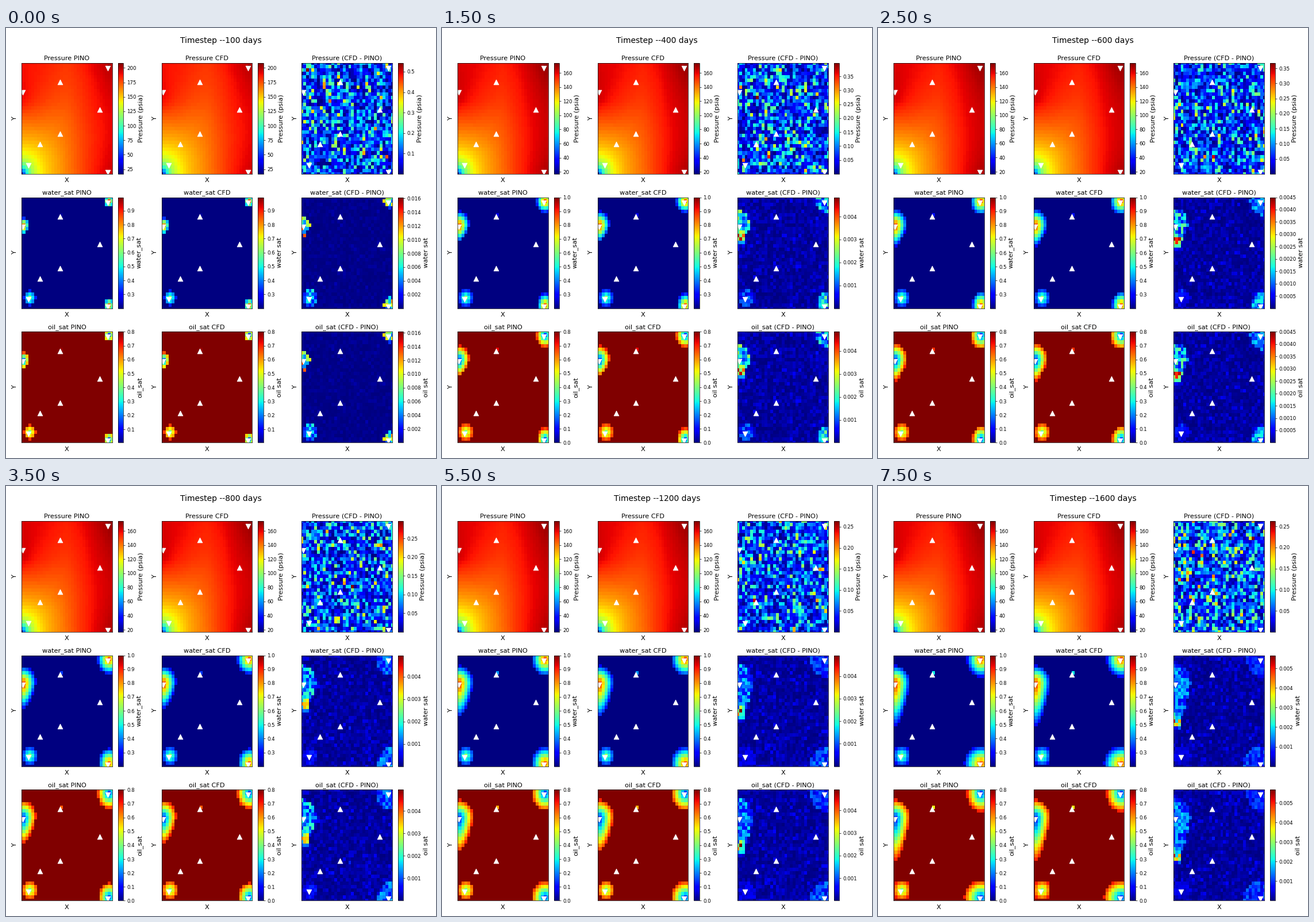
A matplotlib script that plays this animation: 748x748 px, repeating every 8000 ms.

```python
import numpy as np
import matplotlib.pyplot as plt
from matplotlib.animation import FuncAnimation

SIZE, FRAMES, STEP_MS, N = 748, 16, 500, 33
DPI = SIZE / 12
plt.rcParams["font.family"] = "DejaVu Sans"

INJECTORS = [(1, 24), (3, 3), (31, 1), (31, 31)]
PRODUCERS = [(14, 27), (28, 19), (14, 12), (7, 9)]
X, Y = np.meshgrid(np.arange(N), np.arange(N))

# Coarse relative pressure, top row first
PRESSURE = np.array([
    [.920, .910, .895, .875, .905, .950, .985],
    [.930, .905, .880, .865, .890, .930, .965],
    [.935, .885, .860, .850, .880, .920, .945],
    [.830, .830, .820, .825, .870, .910, .935],
    [.760, .765, .780, .810, .860, .905, .935],
    [.690, .700, .745, .800, .860, .910, .945],
    [.680, .680, .740, .795, .860, .920, .965],
])

# Samples over the time steps: step, pressure error, saturation error, noise level
STEPS = [1, 2, 3, 4, 6, 8, 10, 12, 16]
P_TOP = [208.7, 178, 175, 174.5, 174.4, 174.4, 174.4, 174.4, 174.4]
P_ERR = [.543, .48, .42, .398, .3677, .2965, .3203, .264, .2627]
S_ERR = [.01616, .0085, .006, .00484, .0045, .00495, .00488, .00492, .00567]
P_NOISE = [.34, .3, .26, .24, .23, .27, .25, .24, .31]


def at(values, t):
    return float(np.interp(t, STEPS, values))


def grow(start, gain, t, tau):
    return start + gain * (1 - np.exp(-(t - 1) / tau))


def blur(a, passes=1):
    for _ in range(passes):
        p = np.pad(a, 1, mode="edge")
        a = (p[:-2, 1:-1] + p[2:, 1:-1] + 2 * p[1:-1, 1:-1]) / 4
        p = np.pad(a, 1, mode="edge")
        a = (p[1:-1, :-2] + p[1:-1, 2:] + 2 * p[1:-1, 1:-1]) / 4
    return a


def upsample(table):
    nodes = np.linspace(0, N - 1, len(table))
    cells = np.arange(N)
    rows = np.array([np.interp(cells, nodes, r) for r in table[::-1]])
    return np.array([np.interp(cells, nodes, c) for c in rows.T]).T


BASE = blur(upsample(PRESSURE), 2)
DIP = .69 * np.exp(-np.hypot(X, Y) / 2.2)


def pressure(t):
    z = BASE * (.972 if t == 1 else .99 if t == 2 else 1) - DIP
    z[31, 31] = 1
    return np.clip(z, 0, 1)


def cone(cx, cy, w, h):
    return 1 - np.hypot((X - cx) / w, (Y - cy) / h)


def plumes(t):
    """Height above the flood front for each injector, 1 at the well."""
    down, up = 3 + .62 * (t - 1), grow(2.2, 2.9, t, 3)
    dy = Y - 24
    below = np.clip(-dy / down, 0, 1)
    width = grow(2.3, 3, t, 5) * (1 - .4 * below)
    left = 1 - np.hypot((X - .6) / width, dy / np.where(dy < 0, down, up))
    r = grow(2, 3.4, t, 6)
    return [
        left,
        cone(3, 3, grow(2.2, .8, t, 6), grow(2.2, .6, t, 6)),
        cone(31, .8, 2 + .27 * (t - 1), grow(2.2, 2.8, t, 5)),
        cone(31, 31, r, r),
    ]


def water(t):
    """Movable water fraction, 0 to 1."""
    w = np.zeros((N, N))
    for s, peak in zip(plumes(t), (.78, .42, .75, .75)):
        w = np.maximum(w, np.where(s > 0, .12 + peak * s, 0))
    w[27, 14] = max(w[27, 14], .023 * t)
    return np.clip(w, 0, 1)


def pressure_error(t):
    rng = np.random.default_rng(40 + t)
    fine = rng.normal(size=(N, N))
    fine[1:] += .45 * fine[:-1]
    patch = blur(rng.normal(size=(N, N)), 1)
    z = np.abs(fine / 1.1 + .5 * patch) * at(P_NOISE, t)
    return np.clip(z / max(z.max(), .95), 0, 1)


def water_error(t):
    rng = np.random.default_rng(90 + t)
    z = np.abs(rng.normal(size=(N, N))) * (.015 if t == 1 else .042)
    fade = np.exp(-(t - 1) / 4.5)
    levels = (.33 + .5 * fade, .1 + .3 * fade, .22 + .55 * fade, .2 + .5 * fade)
    for s, level in zip(plumes(t), levels):
        speckle = rng.uniform(.25, 1, (N, N)) * level
        z = np.where(s > -.05, np.maximum(z, speckle), z)
    if t > 2:
        front = 24 - (3 + .62 * (t - 1))
        edge = np.exp(-((Y - front - 1.5) / 1.8) ** 2) * (X < 3)
        z = np.maximum(z, edge * rng.uniform(.3, 1.1, (N, N)))
    return np.clip(z, 0, 1)


fig = plt.figure(figsize=(12, 12), dpi=DPI, facecolor="white")
title = fig.suptitle("", fontsize=16)


def box(left, top, w, h):
    return fig.add_axes([left / SIZE, 1 - (top + h) / SIZE, w / SIZE, h / SIZE])


def panel(row, col, name, label):
    left, top, h = 27 + 243.6 * col, 60.7 + 233.85 * row, 193
    ax = box(left, top, 157.8, h)
    mesh = ax.pcolormesh(X, Y, np.zeros((N, N)), cmap="jet", shading="nearest",
                         vmin=0, vmax=1)
    ax.set(xlim=(0, N - 1), ylim=(0, N - 1), xticks=[], yticks=[])
    ax.set_title(name, fontsize=13)
    ax.set_xlabel("X", fontsize=13, labelpad=7.5)
    ax.set_ylabel("Y", fontsize=13, labelpad=7.5)
    for wells, mark in ((INJECTORS, "v"), (PRODUCERS, "^")):
        xy = np.array(wells) - .5
        ax.scatter(xy[:, 0], xy[:, 1], s=100, marker=mark, color="white")
    bar = fig.colorbar(mesh, cax=box(left + 167.6, top, 9.65, h))
    bar.set_label(label, fontsize=13)
    return mesh


meshes = []
for row, (name, label, plain) in enumerate([
        ("Pressure", "Pressure (psia)", "Pressure (psia)"),
        ("water_sat", "water_sat", "water sat"),
        ("oil_sat", "oil_sat", "oil sat")]):
    meshes.append([
        panel(row, 0, f"{name} PINO", label),
        panel(row, 1, f"{name} CFD", plain),
        panel(row, 2, f"{name} (CFD - PINO)", plain),
    ])


def show(mesh, data, lo, hi):
    mesh.set_array(data)
    mesh.set_clim(lo, hi)


def update(frame):
    t = frame + 1
    title.set_text(f"Timestep --{100 * t} days")
    p_hi, w = at(P_TOP, t), water(t)
    w_hi, o_lo = (.9965, .0035) if t == 1 else (1, 0)
    fields = [
        (17 + pressure(t) * (p_hi - 17), 17, p_hi),
        (.2 + .8 * w, .2005, w_hi),
        (.8 - .8 * w, o_lo, .8),
    ]
    p_err, s_err = at(P_ERR, t), at(S_ERR, t)
    dw = water_error(t) * s_err
    errors = [(pressure_error(t) * p_err, 0.0005, p_err),
              (dw, 1e-6, s_err), (dw, 1e-6, s_err)]
    for row, field, error in zip(meshes, fields, errors):
        show(row[0], *field)
        show(row[1], *field)
        show(row[2], *error)
    return []


anim = FuncAnimation(fig, update, frames=FRAMES, init_func=lambda: update(0),
                     interval=STEP_MS, repeat=True, repeat_delay=0, blit=False)
plt.show()
```
